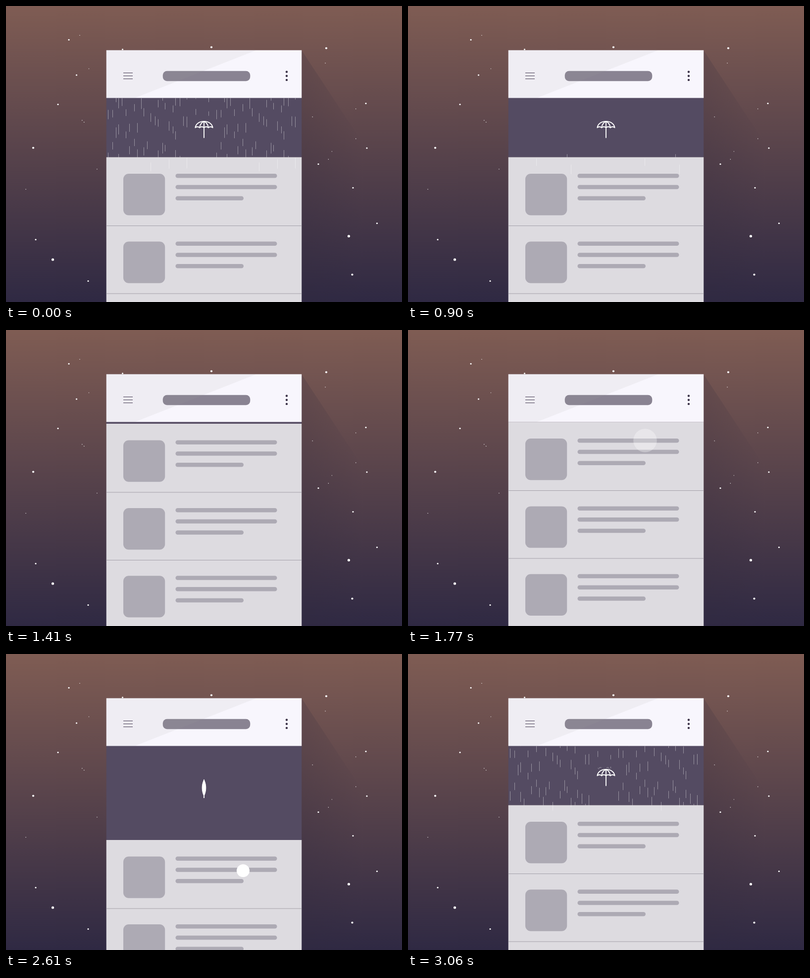
An HTML page with a canvas for the animation above (3.09 s loop, 800 px wide and 600 px high).

```html
<!DOCTYPE html>
<html lang="en">
<head>
<meta charset="utf-8">
<title>Pull to refresh: rain</title>
<style>
  html, body { margin: 0; width: 100%; height: 100%; overflow: hidden; background: #2f2943; }
  canvas { display: block; width: 800px; height: 600px; }
</style>
</head>
<body>
<canvas id="stage" width="800" height="600"></canvas>
<script>
const ctx = document.getElementById('stage').getContext('2d');
const LOOP = 3090, STEP = 30;
const LEFT = 202.7, WIDTH = 394.6, TOP = 89.6, HEADER = 186.4;
const REST = 306.5, PULLED = 377, ROW = 137.4;

const lerp = (a, b, p) => a + (b - a) * p;
const span = (t, a, b) => Math.min(1, Math.max(0, (t - a) / (b - a)));

// cubic-bezier(.4, 0, .2, 1)
function ease(x) {
  let lo = 0, hi = 1;
  for (let i = 0; i < 24; i++) {
    const s = (lo + hi) / 2, q = 1 - s;
    if (1.2 * s * q * q + 0.6 * s * s * q + s ** 3 < x) lo = s; else hi = s;
  }
  return lo * lo * (3 - 2 * lo);
}
const move = (t, a, b) => ease(span(t, a, b));

let seed = 7;
const random = () => (seed = (seed * 16807) % 2147483647) / 2147483647;
const between = (a, b) => lerp(a, b, random());

function circle(x, y, r, color) {
  ctx.fillStyle = color;
  ctx.beginPath();
  ctx.arc(x, y, r, 0, 7);
  ctx.fill();
}
function box(x, y, w, h, r, color) {
  ctx.fillStyle = color;
  ctx.beginPath();
  ctx.roundRect(x, y, w, h, r);
  ctx.fill();
}
function polygon(points, fill) {
  ctx.fillStyle = fill;
  ctx.beginPath();
  points.forEach(p => ctx.lineTo(...p));
  ctx.fill();
}
function clipTo(top, bottom) {
  ctx.save();
  ctx.beginPath();
  ctx.rect(LEFT, top, WIDTH, bottom - top);
  ctx.clip();
}

// Bright stars from largest to smallest, then a scatter of tiny ones
const bright = [
  [94.5, 514], [692.5, 466.5],
  [647, 85.5], [415, 83.5], [55, 287.5], [699.5, 544.5],
  [127, 68.5], [235.5, 88], [142.5, 140], [105, 199.5], [60, 473.5], [166, 557.5],
  [727, 197.5], [729, 288], [631, 320.5], [701, 368.5], [749.5, 440.5]
];
const tiny = Array.from({ length: 12 }, (_, i) => [between(40, 196) + (i % 2) * 560, between(40, 400)]);

function drawSky() {
  const sky = ctx.createLinearGradient(0, 0, 0, 600);
  sky.addColorStop(0, '#7f5c53');
  sky.addColorStop(1, '#2f2943');
  ctx.fillStyle = sky;
  ctx.fillRect(0, 0, 800, 600);
  const shade = ctx.createLinearGradient(597, 0, 722, 0);
  shade.addColorStop(0, 'rgba(47,41,60,.2)');
  shade.addColorStop(1, 'rgba(47,41,60,0)');
  polygon([[597, 89.6], [722, 280], [722, 600], [597, 600]], shade);
  bright.forEach(([x, y], i) => circle(x, y, i < 2 ? 2.6 : i < 6 ? 2.1 : 1.6, '#fff'));
  tiny.forEach(([x, y]) => circle(x, y, 0.7, '#fff'));
}

function drawHeader() {
  ctx.fillStyle = '#f8f6fd';
  ctx.fillRect(LEFT, TOP, WIDTH, HEADER - TOP);
  box(316.8, 131.8, 176.5, 20.4, 8.5, '#898392');
  polygon([[LEFT, TOP], [506, TOP], [260, HEADER], [LEFT, HEADER]], 'rgba(158,152,152,.1)');
  for (let i = 0; i < 3; i++) {
    box(237, 135 + i * 6, 19, 1.2, 0, '#5d5468');
    circle(567, 133.5 + i * 8.2, 2.2, '#3b3247');
  }
}

function drawList(y) {
  ctx.fillStyle = '#dddbe0';
  ctx.fillRect(LEFT, y, WIDTH, 600 - y);
  for (let row = y; row < 600; row += ROW) {
    box(237, row + 33.6, 84.2, 84.2, 11, '#adaab4');
    for (let i = 0; i < 3; i++) {
      box(342.5, row + 33.6 + i * 22.7, i < 2 ? 205 : 137.5, 8.5, 4.25, '#adaab4');
    }
    box(LEFT, row + 138.6, WIDTH, 1, 0, '#a3a0a9');
  }
}

function listTop(t) {
  if (t < 1740) return lerp(REST, HEADER, move(t, 1085, 1500));
  if (t < 2610) return lerp(HEADER, PULLED, move(t, 1905, 2300));
  return lerp(PULLED, REST, move(t, 2610, 3000));
}

// stretch pulls the folded umbrella up out of view
function umbrellaPose(t) {
  if (t < 1300) {
    const open = 1 - move(t, 900, 1050);
    return { open, stretch: span(t, 1050, 1200) ** 2, top: 234, bottom: lerp(271, 267.5, open) };
  }
  const open = move(t, 2610, 2940);
  return {
    open, stretch: (1 - span(t, 2040, 2310)) ** 2,
    top: lerp(255, 234, open), bottom: lerp(292, 267.5, open)
  };
}

function drawUmbrella(t) {
  const { open, stretch, top, bottom } = umbrellaPose(t);
  const y = top - 295 * stretch, end = bottom - 150 * stretch;
  const mix = (a, b) => lerp(a, b, open);
  const w = mix(0.8, 17.6), h = mix(31 + 40 * stretch, 12.6);
  const ax = mix(5, 10), ay = mix(h * 0.3, 0), bx = mix(5, 16.5), by = mix(h * 0.7, 5);
  clipTo(HEADER, listTop(t));
  ctx.translate(400, y);
  ctx.strokeStyle = '#fff';
  ctx.lineWidth = mix(1, 1.9);
  ctx.lineJoin = ctx.lineCap = 'round';
  ctx.beginPath();
  ctx.moveTo(0, 0);
  ctx.bezierCurveTo(-ax, ay, -bx, by, -w, h);
  for (let i = -1; i < 3; i++) {
    const x = i * w / 2;
    ctx.quadraticCurveTo(x - w / 4, h - 3.6 * open, x, h);
  }
  ctx.bezierCurveTo(bx, by, ax, ay, 0, 0);
  ctx.fillStyle = `rgba(255,255,255,${1 - open})`;
  ctx.fill();
  ctx.stroke();
  for (const side of [-1, 1]) {
    ctx.beginPath();
    ctx.moveTo(0, 0);
    ctx.quadraticCurveTo(side * w * 0.45, h * 0.3, side * w / 2, h);
    ctx.stroke();
  }
  ctx.lineWidth = 1.9;
  ctx.lineCap = 'butt';
  ctx.beginPath();
  ctx.moveTo(0, 0);
  ctx.lineTo(0, end - y);
  ctx.stroke();
  ctx.restore();
}

// Drops fall their own length each step; births are in steps around the loop point.
const PANEL = 306, FRONT = 325, DOME = 236;
function column(x, len, limit, gap) {
  const births = [];
  for (let b = between(-10, -10 + gap); b < 23; b += gap * between(0.5, 1.5)) births.push(b);
  return { x, len, limit, births };
}
const rain = [column(383, 12, DOME, 2.5), column(409, 9, DOME, 2.5)];
for (let i = 0; i < 23; i++) {
  const front = i % 5 === 2;
  const x = 207 + Math.round(i * 7.2 + between(-2, 2));
  const left = column(x, between(13, 22), front ? FRONT : PANEL, 4.5);
  rain.push(left, { ...left, x: x + 219 });
}

function drawSplash(x) {
  const side = Math.sign(400 - x);
  ctx.strokeStyle = 'rgba(255,255,255,.45)';
  ctx.lineWidth = 1;
  ctx.beginPath();
  ctx.arc(x + side * 6, 234, 4, 4.2 - (side + 1) * 0.45, 6.1 - (side + 1) * 0.45);
  ctx.stroke();
}

function drawRain(step, front) {
  clipTo(HEADER, 600);
  ctx.fillStyle = 'rgba(255,255,255,.4)';
  for (const { x, len, limit, births } of rain) {
    if ((limit === FRONT) !== front) continue;
    for (const born of births) {
      const y = HEADER + (step - born) * len;
      if (y < HEADER - len || y >= limit) continue;
      const end = limit === DOME ? Math.min(y + len, 232) : y + len;
      if (end > y) ctx.fillRect(x, y, 1, end - y);
      if (limit === DOME && y > 220) drawSplash(x);
    }
  }
  ctx.restore();
}

function drawTouch(t) {
  if (t < 1740 || t > 2790) return;
  const shown = span(t, 1710, 1905), gone = span(t, 2610, 2760);
  const y = lerp(224, 439.3, move(t, 1905, 2370));
  const r = lerp(29, 12, shown) + span(t, 2200, 2370) + 11 * gone;
  circle(479, y, r, `rgba(255,255,255,${shown - gone})`);
}

function draw(t) {
  const y = listTop(t);
  const step = (t > 2400 ? t - LOOP : t) / STEP;
  drawSky();
  ctx.fillStyle = '#544b62';
  ctx.fillRect(LEFT, HEADER - 1, WIDTH, y - HEADER + 1);
  drawRain(step, false);
  drawUmbrella(t);
  drawList(y);
  drawHeader();
  drawRain(step, true);
  drawTouch(t);
}

const start = performance.now();
function tick() {
  const t = (performance.now() - start) % LOOP;
  draw(Math.floor(t / STEP) * STEP);
  requestAnimationFrame(tick);
}
tick();
</script>
</body>
</html>
```
